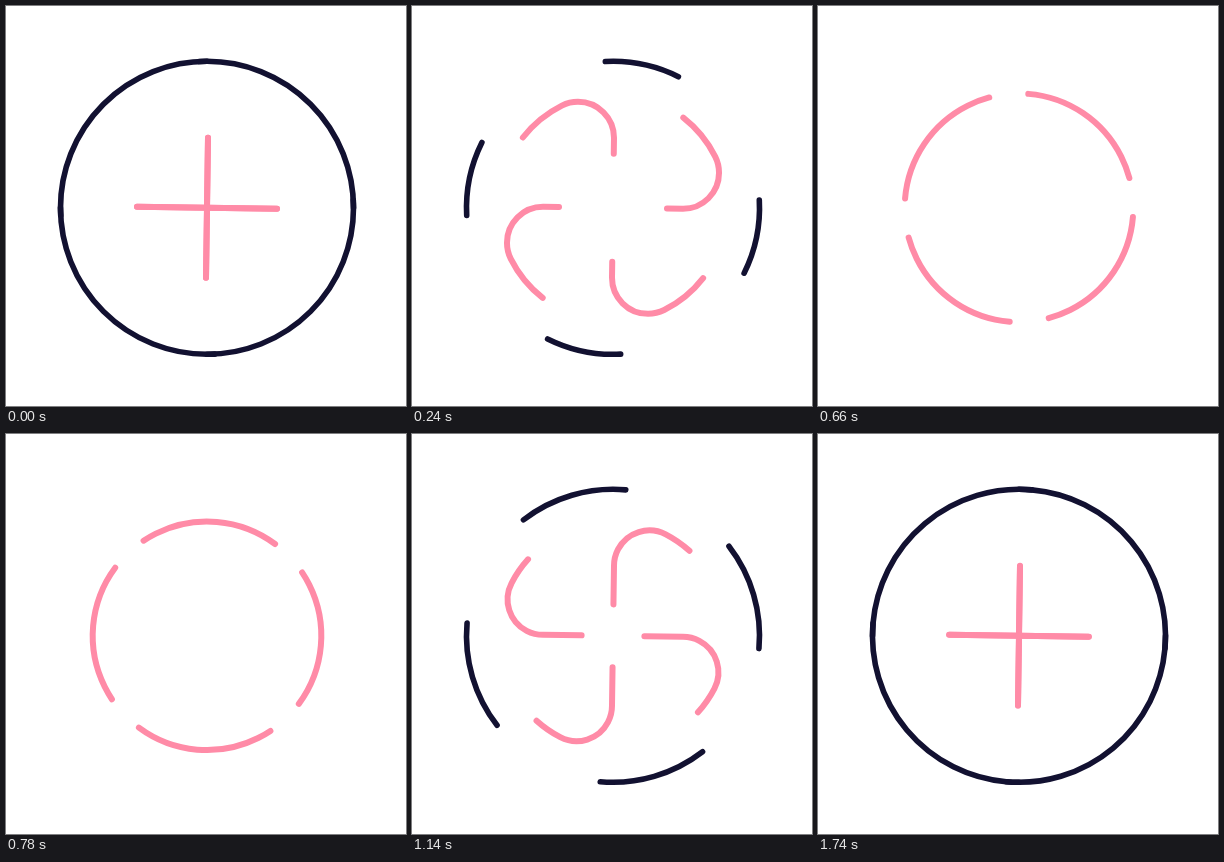
An HTML page with a canvas for the animation above (7.36 s loop, 400x400 px).

```html
<!DOCTYPE html>
<html lang="en">
<head>
<meta charset="utf-8">
<title>Plus in a circle</title>
<style>
  html, body { margin: 0; height: 100%; overflow: hidden; background: #fff; }
  canvas { display: block; }
</style>
</head>
<body>
<canvas width="400" height="400"></canvas>
<script>
const ctx = document.querySelector('canvas').getContext('2d');
const LOOP = 7360, STEP = 30;
const PINK = '#ff8ba7', DARK = '#121131';
const ORBIT = 114.3, RING = 146.5, ARM = 70, BAR = 2 * ARM, TRAVEL = 896.2;
const DEG = Math.PI / 180;
const RING_SPEED = 0.512; // ring degrees per pixel of bar travel

// Time, distance travelled and speed of the bars
const KEYS = [
  [0, 0, 0], [240, 124, 1], [480, 413, 0.95], [660, 549, 0.67],
  [930, 708.5, 0.5], [1140, 794, 0.36], [1500, 893.5, 0.03], [1740, TRAVEL, 0]
];

function travel(t) {
  const i = KEYS.findIndex(key => t < key[0]);
  if (i < 0) return TRAVEL;
  const [t0, p0, v0] = KEYS[i - 1], [t1, p1, v1] = KEYS[i];
  const d = t1 - t0, u = (t - t0) / d, w = 1 - u;
  return p0 * w * w * (1 + 2 * u) + p1 * u * u * (1 + 2 * w)
    + d * u * w * (v0 * w - v1 * u);
}

// Radius of the turn that touches both the arm (at x = 1) and the orbit
const turn = side => (ORBIT ** 2 - ARM ** 2 - 1) / (2 * (ORBIT + side));

// Along the bar, out to the orbit, once around, back into the bar
function makeTrack() {
  const path = new Path2D();
  const rOut = turn(-1), rIn = turn(1);
  const aOut = Math.atan2(-ARM, 1 - rOut), aIn = Math.atan2(-ARM, 1 + rIn);
  path.moveTo(-1, ARM);
  path.lineTo(1, -ARM);
  path.arc(1 - rOut, -ARM, rOut, 0, aOut, true);
  path.arc(0, 0, ORBIT, aOut, aIn, true);
  path.arc(1 + rIn, -ARM, rIn, aIn, -Math.PI, true);
  path.lineTo(-1, ARM);
  return path;
}
const track = makeTrack();

function ringArc(from, to) {
  if (to <= from) return;
  ctx.beginPath();
  ctx.arc(0, 0, RING, -from * DEG, -to * DEG, true);
  ctx.stroke();
}

function draw(t) {
  const dist = travel(t);
  ctx.setTransform(1, 0, 0, 1, 0, 0);
  ctx.clearRect(0, 0, 400, 400);
  ctx.translate(201, 201.8);
  ctx.lineCap = 'round';
  for (let k = 0; k < 4; k++) {
    ctx.rotate(Math.PI / 2);
    ctx.setLineDash([]);
    ctx.lineWidth = 5.6;
    ctx.strokeStyle = DARK;
    if (dist < TRAVEL / 2) ringArc(RING_SPEED * dist, 93);
    else ringArc(-5, 90 - RING_SPEED * (TRAVEL - dist));
    ctx.setLineDash([BAR, 3000]);
    ctx.lineDashOffset = -dist;
    ctx.lineWidth = 6;
    ctx.strokeStyle = PINK;
    ctx.stroke(track);
  }
}

const start = performance.now();
function frame() {
  const t = (performance.now() - start) % LOOP;
  draw(Math.floor(t / STEP) * STEP);
  requestAnimationFrame(frame);
}
frame();
</script>
</body>
</html>
```
